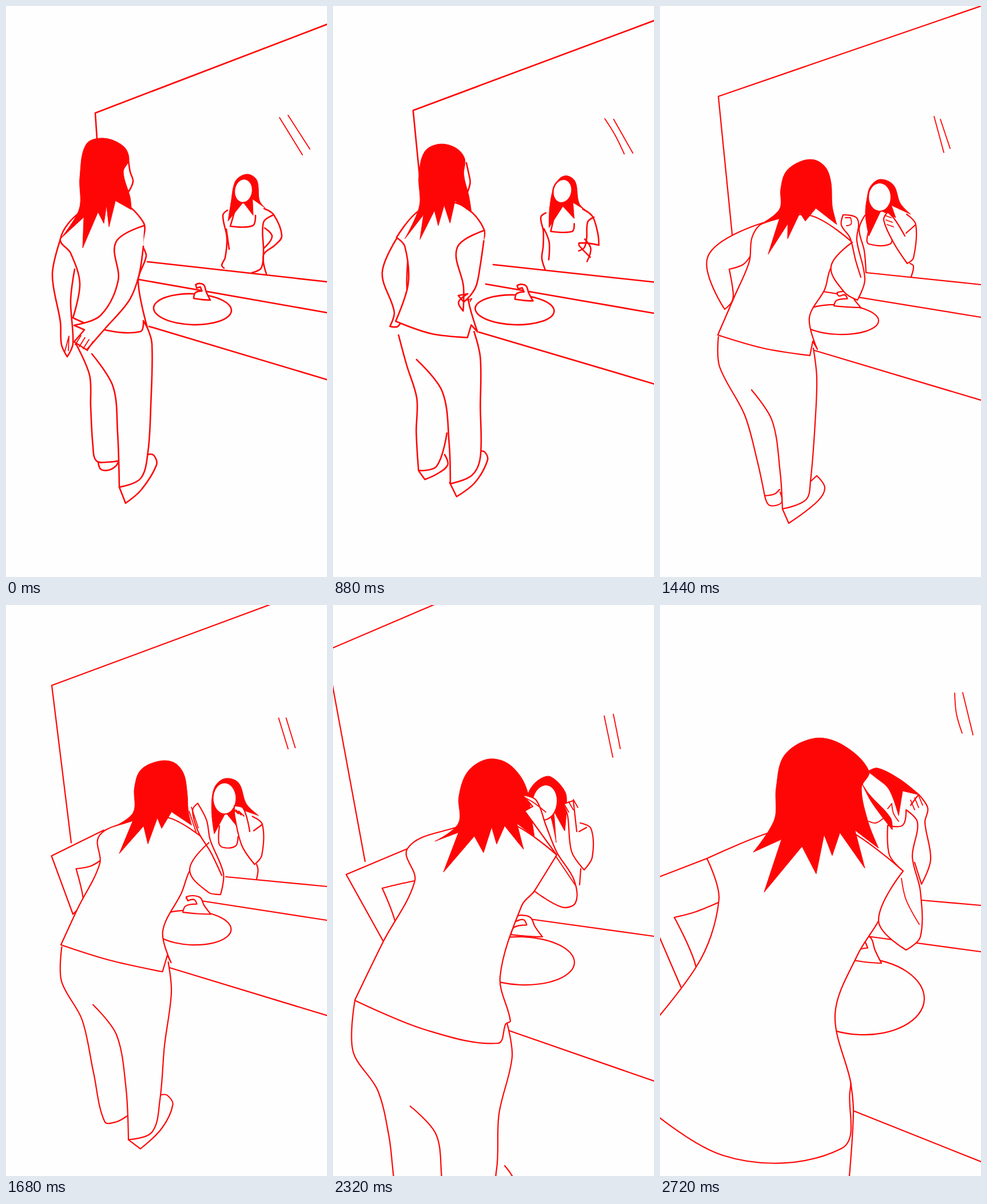
These frames come from a looping animation (561 px wide and 998 px high, 2800 ms). An HTML page:

```html
<!DOCTYPE html>
<html lang="en">
<head>
<meta charset="utf-8">
<title>At the mirror</title>
<style>
html, body { margin: 0; width: 100%; height: 100%; overflow: hidden; background: #fefefe; }
svg { display: block; width: 100vw; height: 100vh; }
path { stroke: #ff0606; stroke-linecap: round; stroke-linejoin: round; }
.line, .ring { fill: none; }
.thin { fill: none; stroke-width: 1.8; }
.body, .shape { fill: #fefefe; }
.hair { fill: #ff0606; stroke-width: 1; }
</style>
</head>
<body>
<svg id="stage" viewBox="0 0 561 998"></svg>
<script>
const LOOP = 2800, STEP = 80;
const KEYS = [0, 640, 1120, 1440, 1920, 2320, 2720];
const stage = document.getElementById('stage');
const parts = [];

const points = s => s.trim().split(' ').map(p => p.split(',').map(Number));
const mix = (a, b, k) => a + (b - a) * k;
const between = (p, q, k) => [mix(p[0], q[0], k), mix(p[1], q[1], k)];
const shift = (p, [dx, dy]) => [p[0] + dx, p[1] + dy];

// One pose per key time: text or a ready shape, [dx, dy] moves the previous pose, '' hides the part.
function part(cls, poses, follow) {
  const el = document.createElementNS('http://www.w3.org/2000/svg', 'path');
  el.setAttribute('class', cls);
  stage.append(el);
  const keys = [];
  for (const pose of poses) {
    if (!pose) keys.push(null);
    else if (typeof pose === 'string') keys.push(pose.split('/').map(points));
    else if (typeof pose[0] === 'number') keys.push(keys.at(-1).map(c => c.map(p => shift(p, pose))));
    else keys.push(pose);
  }
  const made = { el, keys, follow, closed: ['ring', 'shape', 'hair'].includes(cls) };
  parts.push(made);
  return made;
}
const SAME = [0, 0];

function oval(cx, cy, rx, ry, tilt = 0) {
  const t = tilt * Math.PI / 180, c = Math.cos(t), s = Math.sin(t);
  return [Array.from({ length: 16 }, (_, i) => {
    const x = rx * Math.cos(i * Math.PI / 8), y = ry * Math.sin(i * Math.PI / 8);
    return [cx + x * c - y * s, cy + x * s + y * c];
  })];
}

// Crown of the head, then lock tips from right to left with a notch after each.
function mane(crown, tips, depth = .35) {
  const top = points(crown), ends = points(tips);
  const mid = [0, 1].map(d => top.reduce((sum, p) => sum + p[d], 0) / top.length);
  const fringe = ends.flatMap((p, i) => i ? [between(between(ends[i - 1], p, .5), mid, depth), p] : [p]);
  return [[...top, ...fringe]];
}

// Equal short strokes in a row.
const fan = (n, x, y, sx, sy, dx, dy) => Array.from({ length: n }, (_, i) =>
  [[x + i * sx, y + i * sy], [x + i * sx + dx, y + i * sy + dy]]);

// The tap, fitted to a box.
const TAP = points('0,.9 .1,.57 .5,.47 .4,.23 .18,.3 .12,.1 .33,.03 .62,.13 .76,.53 1,1 .5,.97');
const tap = (x, y, w, h) => [TAP.map(p => [x + p[0] * w, y + p[1] * h])];

// Room
part('line', ['561,32 156,187/156,187 159,232', SAME, '561,19 124,178/124,178 145,378',
  '561,0 102,158/102,158 127,408', '561,-75 58,123/58,123 101,423',
  '561,-165 -12,80/-12,80 56,448', '561,-260 -110,0/-110,0 -30,470']);
part('thin', ['478,195 518,260/493,191 531,250', SAME, '472,199 487,222 500,257/488,205 517,264',
  '479,193 496,256/490,198 507,249', '474,202 490,247/489,197 504,250',
  '474,194 489,266/490,191 502,251', '515,154 518,190 528,224/529,153 547,227']);

// Reflection
part('line', ['387,357 379,366 386,405 383,440 377,453 381,458/385,390 390,425', [-4, 0],
  '361,366 349,374 356,388 355,420 364,462/356,388 372,418 368,462',
  '358,366 348,390 357,428 360,466', '', '', '']);
part('line', ['399,361 392,385 431,384 436,366', [-5, 2], '382,360 374,401 410,402 412,393',
  '374,360 362,405 365,416 402,416 406,398', '372,412 385,430 398,432 405,412', '', '']);
part('hair', [
  mane('393,345 400,308 413,296 427,295 439,306 443,340', '453,353 432,366 388,376', .5), [-4, 1],
  mane('368,362 374,330 384,305 397,298 412,308 422,350', '447,368 415,376 371,398', .5),
  mane('359,365 362,335 368,315 385,303 408,313 420,345', '438,364 412,370 365,402', .5),
  mane('361,375 358,340 366,314 384,303 405,309 420,350', '445,372 400,410 363,398', .5),
  mane('341,331 352,312 368,301 380,300 398,315 408,335', '405,395 390,415 347,340', .5),
  '363,291 380,285 420,305 454,332 424,325 417,368 400,322 375,300']);
part('shape', [oval(415, 323, 16, 21, 8), oval(411, 323, 16, 20, 8), oval(391, 324, 17, 22, 18),
  oval(384, 334, 20, 25), oval(380, 342, 21, 30), oval(370, 345, 22, 31, 8), '']);
part('body', ['451,354 468,365 482,402 470,418 450,435 455,468', [-3, 1],
  '425,355 447,373 455,415 452,431 420,412 404,400 412,392 447,409',
  '431,364 447,382 443,440 432,450 409,415 391,374 398,360 411,374 428,402',
  '430,375 449,385 451,435 437,457 415,425 408,362 400,342 418,336 424,390', [2, 6],
  '438,350 452,331 468,355 463,380 473,445 457,488 445,450']);
part('line', ['468,365 450,378 450,430 446,458 430,466/452,388 465,403 450,424', [-4, 0],
  '448,373 433,390/432,427 440,445 442,469', '447,382 430,397/437,450 443,455 439,473',
  '449,385 436,392/439,457 437,485', [-6, 4], '']);
part('thin', ['', '', '', fan(3, 393, 366, 2, 8, 11, 4), fan(3, 400, 346, 8, -4, 8, 14), [4, 2],
  fan(3, 438, 341, 7, -4, 7, 17)]);

// Counter, sink and tap
part('line', ['247,447 561,482', SAME, '313,457 561,483', '360,466 561,487', '408,484 561,497', '', '458,516 561,525']);
part('line', ['232,478 561,536', SAME, '302,494 561,538', '285,499 561,544', '345,527 561,558', '345,549 561,579', '355,578 561,606']);
part('line', ['250,560 561,653', SAME, '260,580 561,668', '270,602 561,689', '299,665 561,746', '305,743 561,832', '338,884 561,973']);
part('ring', [oval(326, 530, 68, 27, 2), SAME, oval(309, 532, 70, 25, 2), oval(312, 548, 70, 26, 2),
  oval(335, 580, 70, 34, 4), oval(330, 622, 92, 42, 2), oval(350, 684, 112, 67, 3)]);
part('shape', [tap(328, 484, 29, 30), SAME, tap(308, 487, 34, 30), tap(304, 498, 47, 29),
  tap(314, 516, 51, 38), tap(311, 541, 55, 39), tap(339, 576, 48, 50)]);

// Feet and legs
part('body', ['161,797 166,810 180,811 192,804 197,795', SAME, '140,830 155,845 183,825 209,800 193,773',
  '183,856 190,872 202,873 213,867 210,850', '', '', '']);
part('body', ['198,841 209,869 236,846 263,802 258,785 247,784', [-2, -4],
  '212,829 225,850 262,824 279,790 274,778 266,776', '214,879 225,904 275,866 288,842 274,821 262,832',
  '214,990 245,997 269,964 295,905 290,893 280,880', [20, 100], '']);
part('body', ['122,590 146,645 148,700 152,770 158,795 180,797 197,795', SAME,
  '107,560 112,612 145,672 139,720 141,829 182,812 201,698',
  '102,578 104,630 148,715 170,795 183,856 200,853 209,845',
  '93,617 90,685 118,735 136,840 162,950 185,954 213,942',
  '38,693 35,780 78,848 98,930 106,1000 120,1100 150,1100', [-60, 250]]);
part('body', ['150,608 187,665 195,745 198,841 235,826 248,780 253,700 255,590 246,560', SAME,
  '142,628 195,683 211,785 212,829 250,815 267,797 262,700 260,640 247,578',
  '160,671 196,725 210,815 214,879 255,863 263,830 271,730 274,650 268,598',
  '144,726 190,777 209,870 214,990 255,980 275,900 283,810 304,705 299,650',
  '135,876 180,925 190,1000 200,1100 260,1100 286,985 290,890 313,790 304,730',
  '90,1060 150,1100 180,1150 200,1250 270,1240 320,1100 331,998 338,885 333,833']);

// Arms, shirt and head
const left = part('body', ['95,408 81,470 95,552 97,592 107,613 117,590 113,515 120,460',
  '95,408 81,470 97,552 81,600 98,609 112,580 113,515 120,460',
  '128,404 91,463 117,517 118,520 130,510 145,480 145,440 142,415',
  '180,379 84,437 113,530 125,518 128,503 121,460 145,452 158,437',
  '162,408 75,440 121,551 135,535 142,526 124,462 150,461 172,456',
  '130,426 23,471 88,588 100,575 110,560 86,495 115,488 143,482',
  '82,443 -40,490 38,671 50,655 63,633 25,546 60,537 102,520']);
part('shape', [
  '117,545 129,485 113,432 95,407 130,360 189,338 240,378 239,418 245,437 231,480 247,562 240,550 235,569 172,566', SAME,
  '102,557 134,485 138,408 127,402 172,355 240,350 287,401 268,450 252,487 238,518 258,577 243,565 235,590 170,579',
  '101,575 130,508 156,447 161,404 180,380 262,366 336,413 299,457 288,495 261,545 275,600 267,586 262,611 180,598',
  '91,613 121,552 172,456 162,408 215,388 300,376 373,418 343,472 326,510 287,595 302,650 297,638 285,671 180,643',
  '38,691 88,588 143,482 130,426 200,393 300,378 391,437 352,500 330,525 292,650 310,727 302,732 288,766 160,742',
  '-90,820 63,633 103,515 82,443 200,395 300,380 425,465 382,552 345,612 306,715 333,833 332,850 317,950 110,962']);
part('line', ['214,270 217,290 222,307 212,328', SAME, '252,278 259,300 254,333', '', '', '', '']);
part('hair', [
  mane('128,355 129,300 140,242 170,231 205,245 215,268 205,290 217,335', '219,356 180,386 171,380 134,423 95,407'), SAME,
  mane('174,345 171,295 180,268 200,252 222,250 245,265 252,300 258,330', '265,366 229,373 197,388 170,393 156,407'),
  mane('209,355 211,320 220,290 245,272 270,269 290,283 299,310 301,350', '309,382 254,376 223,407 189,434 178,380'),
  mane('236,370 238,320 250,288 285,275 315,281 330,305 334,345 336,370', '340,388 290,405 273,428 207,435 205,392'),
  mane('219,382 220,335 235,292 268,270 302,275 328,300 341,330 346,365', '352,405 333,427 286,418 263,433 193,467 178,413'),
  mane('200,375 203,320 218,262 270,233 320,245 365,290 352,320 364,380', '382,425 358,460 301,438 273,470 182,502 163,432')]);
const right = part('body', [
  '241,384 192,413 196,480 165,541 119,558 137,566 119,587 141,601 173,564 215,515 232,472 240,420',
  '241,384 192,413 196,480 178,546 131,573 150,578 133,600 166,615 190,570 215,522 231,480 240,420',
  '287,401 242,432 260,500 277,520 308,462 321,428 305,412 291,420 294,437 287,452 284,425 287,401',
  '336,413 299,455 322,500 345,514 358,478 344,410 345,372 320,365 317,383 332,405 342,445 351,474',
  '373,418 343,470 385,504 405,498 402,460 370,412 356,380 350,328 335,335 340,388 373,418 403,471',
  '391,437 352,500 400,528 424,520 421,480 391,432 372,385 355,341 331,332 349,352 335,360 391,437',
  '425,465 382,552 430,603 455,580 455,500 441,440 450,380 430,358 424,385 398,385 401,437 425,465']);

// Fingers and a loose lock
part('thin', [fan(4, 121, 592, 7, 3.5, 10, -16), fan(4, 141, 600, 6, 6, 9, -14), '292,418 305,414 302,419',
  '324,370 333,370 334,381 326,384', fan(2, 335, 342, 4, -7, 12, 36), '334,336 350,345 372,362/390,440 423,489',
  '398,356 405,347 408,364 417,378/422,478 430,515 453,558/365,378 377,381 390,373'], [right, 7]);
part('thin', ['103,603 110,577 109,602', fan(3, 84, 607, 8, 0, 9, -15), '', '', '', '', ''], [left, 3]);
part('hair', ['', '', '', '', '', '', '352,310 365,330 403,372 406,393 370,345']);

function fit(pts, n) {
  if (pts.length === n) return pts;
  return Array.from({ length: n }, (_, i) => {
    const u = i * (pts.length - 1) / (n - 1), j = Math.min(Math.floor(u), pts.length - 2);
    return between(pts[j], pts[j + 1], u - j);
  });
}

function blend({ keys, follow }, i, k) {
  const a = keys[i], b = keys[i + 1];
  if (!k) return a;
  const nearest = k < .5 ? i : i + 1, near = keys[nearest];
  if (follow && near) {
    const [limb, n] = follow, now = blend(limb, i, k)[0][n], then = limb.keys[nearest][0][n];
    return near.map(c => c.map(p => shift(p, [now[0] - then[0], now[1] - then[1]])));
  }
  if (!a || !b || a.length !== b.length) return near;
  return a.map((c, s) => {
    const n = Math.max(c.length, b[s].length), to = fit(b[s], n);
    return fit(c, n).map((p, j) => between(p, to[j], k));
  });
}

// Smooth curve through the points; sharp turns stay corners.
function trace(pts, closed) {
  const n = pts.length, at = i => closed ? pts[(i + n) % n] : pts[i];
  const unit = (a, b) => {
    const x = b[0] - a[0], y = b[1] - a[1], l = Math.hypot(x, y) || 1;
    return [x / l, y / l];
  };
  const tangent = pts.map((p, i) => {
    const a = at(i - 1), b = at(i + 1);
    if (!a || !b) return [0, 0];
    const u = unit(a, p), v = unit(p, b);
    return u[0] * v[0] + u[1] * v[1] < .2 ? [0, 0] : unit(a, b);
  });
  let d = 'M' + pts[0];
  for (let i = 0; i < (closed ? n : n - 1); i++) {
    const j = (i + 1) % n, a = pts[i], b = pts[j];
    const h = Math.hypot(b[0] - a[0], b[1] - a[1]) * .33;
    const c = [a[0] + tangent[i][0] * h, a[1] + tangent[i][1] * h, b[0] - tangent[j][0] * h, b[1] - tangent[j][1] * h, ...b];
    d += 'C' + c.map(v => v.toFixed(1)).join(' ');
  }
  return d + (closed ? 'Z' : '');
}

let shown = -1;
function draw() {
  const t = Math.floor(performance.now() % LOOP / STEP) * STEP;
  if (t !== shown) {
    shown = t;
    const i = KEYS.findLastIndex(key => key <= t);
    const k = i === 0 || i === KEYS.length - 1 ? 0 : (t - KEYS[i]) / (KEYS[i + 1] - KEYS[i]);
    stage.style.strokeWidth = t < KEYS[2] ? 2.6 : 2.2;
    for (const p of parts) {
      const shape = blend(p, i, k);
      p.el.setAttribute('d', shape ? shape.map(c => trace(c, p.closed)).join('') : '');
    }
  }
  requestAnimationFrame(draw);
}
draw();
</script>
</body>
</html>
```
